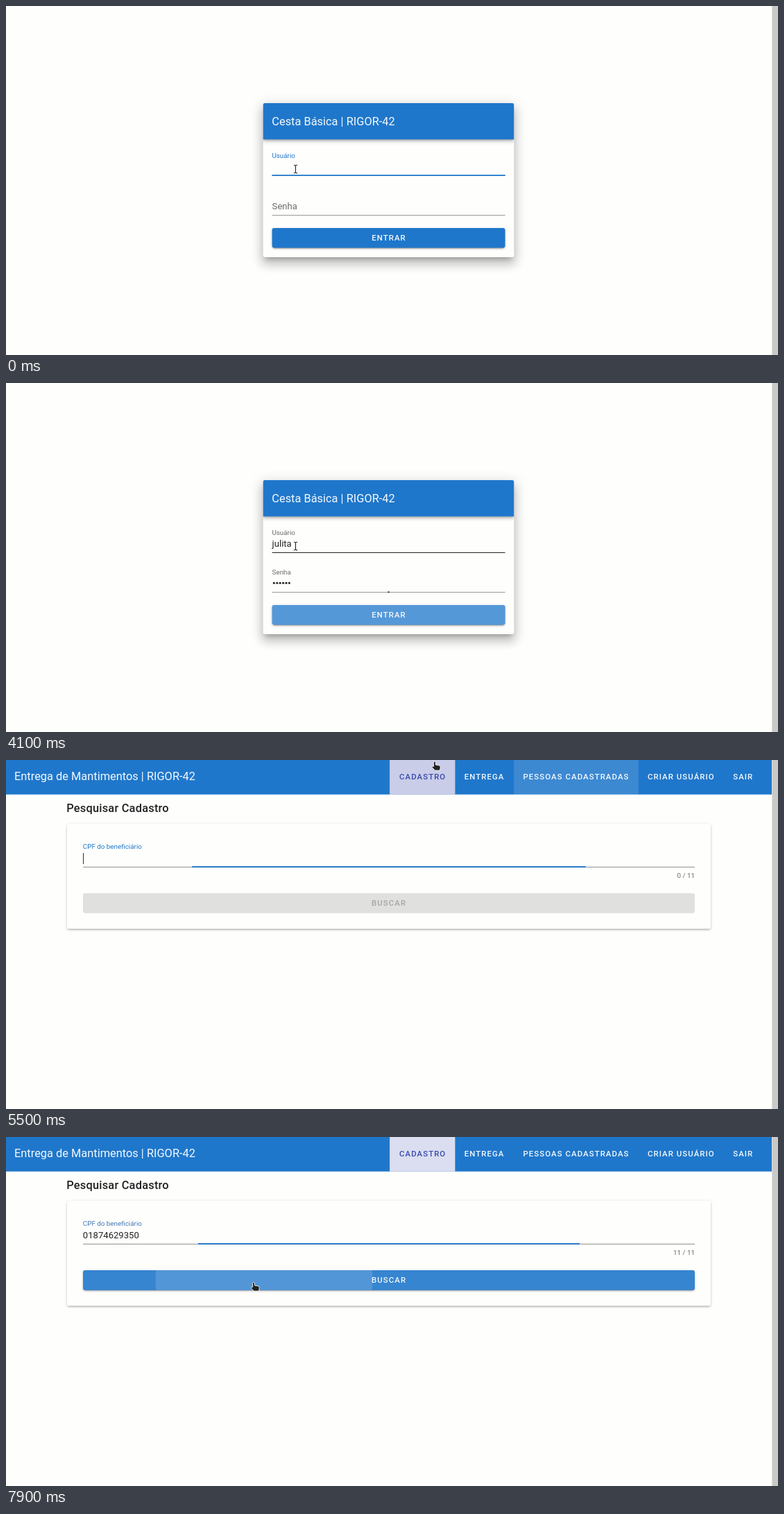
Recreate the animation shown at these times as an HTML page. Size 1113x503 px, loop 8 s.

```html
<!DOCTYPE html>
<html lang="pt-BR">
<head>
<meta charset="utf-8">
<title>Cesta Básica</title>
<style>
html, body { margin: 0; width: 100%; height: 100%; overflow: hidden; background: #fefefd; }
svg { display: block; width: 100vw; height: 100vh; }
text { font-family: Roboto, sans-serif; white-space: pre; }
.title { font-size: 16.4px; fill: #f4f8fc; }
.head { font-size: 16.4px; font-weight: 500; letter-spacing: .0125em; fill: #222; }
.btn { font-size: 11.48px; font-weight: 500; letter-spacing: .0893em; fill: #f4f8fc; }
.small { font-size: 9.84px; fill: #6b6b6b; }
.input { font-size: 13.12px; fill: #222; }
.row { font-size: 12.3px; fill: #222; }
.popup { font: 11.4px "Open Sans", sans-serif; fill: #e8e8e8; }
</style>
</head>
<body>
<svg id="stage" viewBox="0 0 1113 503" preserveAspectRatio="none"></svg>
<script>
const LOOP = 8000, STEP = 100;
const BLUE = '#1f77cb', PAPER = '#fefefd', GREY = '#6b6b6b';
const stage = document.getElementById('stage');

function set(node, attrs) {
  for (const k in attrs) node.setAttribute(k, attrs[k]);
  return node;
}
function add(parent, tag, attrs = {}) {
  const node = document.createElementNS('http://www.w3.org/2000/svg', tag);
  parent.appendChild(node);
  return set(node, attrs);
}
const group = (parent) => add(parent, 'g');
const rect = (parent, x, y, width, height, fill, rx = 0) =>
  add(parent, 'rect', { x, y, width, height, fill, rx });
function text(parent, cls, x, y, value, attrs = {}) {
  const node = add(parent, 'text', { class: cls, x, y, ...attrs });
  node.textContent = value;
  return node;
}
const show = (node, on) => set(node, { visibility: on ? 'visible' : 'hidden' });

// Each shadow layer: [offset y, blur, spread, alpha]
const LIFT = {
  low: [[3, 1, -2, .2], [2, 2, 0, .14], [1, 5, 0, .12]],
  mid: [[2, 4, -1, .2], [4, 5, 0, .14], [1, 10, 0, .12]],
  high: [[7, 8, -4, .2], [12, 17, 2, .14], [5, 22, 4, .12]],
  popup: [[2, 9, 0, .35]]
};
function raised(parent, x, y, w, h, fill, lift, rx = 3) {
  for (const [dy, blur, spread, alpha] of LIFT[lift]) {
    const s = spread * .82;
    rect(parent, x - s, y - s + dy * .82, w + 2 * s, h + 2 * s, '#000', rx)
      .style.cssText = `filter:blur(${blur * .41}px);opacity:${alpha}`;
  }
  return rect(parent, x, y, w, h, fill, rx);
}
function underline(parent, x, y, w, colour) {
  const base = rect(parent, x, y, w, 1, colour);
  const bar = rect(parent, x, y - .8, w, 1.8, BLUE);
  const fill = (part, least = 0) => {
    const width = Math.max(w * part, least);
    set(bar, { x: x + (w - width) / 2, width });
  };
  return { base, bar, fill };
}

// Progress of cubic-bezier(.25, .8, .25, 1) begun at a given time
function ease(t, start, length = 300) {
  const p = Math.min(1, Math.max(0, (t - start) / length));
  if (p === 0 || p === 1) return p;
  let lo = 0, hi = 1;
  for (let i = 0; i < 24; i++) {
    const s = (lo + hi) / 2, r = 1 - s;
    if (.75 * r * r * s + .75 * r * s * s + s * s * s < p) lo = s; else hi = s;
  }
  const s = lo, r = 1 - s;
  return 2.4 * r * r * s + 3 * r * s * s + s * s * s;
}
const lerp = (a, b, p) => a + (b - a) * p;
const within = (t, a, b) => t >= a && t < b;
const passed = (t, times) => times.filter(v => v <= t).length;

rect(stage, 0, 0, 1113, 503, PAPER);

// Login page
const login = group(stage);
raised(login, 370.5, 140, 362, 222, PAPER, 'high');
const headClip = add(add(login, 'clipPath', { id: 'card' }), 'rect',
  { x: 370.5, y: 140, width: 362, height: 222, rx: 3 });
const head = add(login, 'g', { 'clip-path': 'url(#card)' });
raised(head, 370.5, 140, 362, 52.3, BLUE, 'mid', 0);
text(login, 'title', 383.3, 172.3, 'Cesta Básica | RIGOR-42');

const userLabel = text(login, 'small', 383.4, 218.8, 'Usuário');
const userText = text(login, 'input', 383.6, 235.8, '');
const userLine = underline(login, 383.6, 244, 336, '#222');
const passLabel = text(login, 'input', 383.6, 293, 'Senha');
const passLine = underline(login, 383.6, 301.2, 336, '#929291');
const dots = Array.from({ length: 6 }, (_, i) =>
  add(login, 'circle', { cx: 386.4 + i * 4.4, cy: 288.3, r: 1.55, fill: '#222' }));

raised(login, 383.6, 320, 336, 28.6, BLUE, 'low');
const enterGlow = rect(login, 383.6, 320, 336, 28.6, '#fff', 3);
text(login, 'btn', 527.2, 337.5, 'ENTRAR');

const userPopup = group(login);
raised(userPopup, 383, 244.5, 337, 20.5, '#302e2d', 'popup', 0);
text(userPopup, 'popup', 389, 258.6, 'jsdasd');

// Pages behind the login
const app = group(stage);
rect(app, 0, 0, 1104, 49.7, BLUE);
text(app, 'title', 12, 29.3, 'Entrega de Mantimentos | RIGOR-42');
const TABS = [
  ['CADASTRO', 553.2, 94.2, 567], ['ENTREGA', 647.4, 84.8, 660.7],
  ['PESSOAS CADASTRADAS', 732.2, 179.6, 745.4],
  ['CRIAR USUÁRIO', 911.8, 123, 925], ['SAIR', 1034.8, 56, 1048.2]
];
const tabs = TABS.map(([name, x, w, tx]) => ({
  back: rect(app, x, 0, w, 49.7, '#fff'),
  tint: rect(app, x, 0, w, 49.7, '#3949ab'),
  label: text(app, 'btn', tx, 27.6, name)
}));
function paintTab(tab, back, tint, active) {
  set(tab.back, { opacity: back });
  set(tab.tint, { opacity: tint });
  tab.label.style.fill = active ? '#3949ab' : '#f4f8fc';
}

const list = group(app);
text(list, 'head', 87.2, 75, 'Pessoas cadastradas');
raised(list, 88, 92, 928, 39, PAPER, 'low');
text(list, 'row', 107.2, 116, 'Hugo de Nobres | 74915308261');
add(list, 'path', { d: 'M981.6 109.7l4.5 4.5 4.5-4.5', fill: 'none', stroke: '#707070', 'stroke-width': 1.6 });

const search = group(app);
text(search, 'head', 87.2, 75, 'Pesquisar Cadastro');
raised(search, 88, 92, 928, 151.5, PAPER, 'low');
const cpfLabel = text(search, 'small', 110.8, 128, 'CPF do beneficiário');
const cpfText = text(search, 'input', 110.8, 146, '');
const cpfLine = underline(search, 111, 153.8, 882, '#8c8c8b');
const counter = text(search, 'small', 993, 170, '', { 'text-anchor': 'end' });
const caret = rect(search, 111, 134, 1, 16, '#333');
rect(search, 111, 192, 882, 28.7, '#e0e0df', 3);
text(search, 'btn', 527, 210, 'BUSCAR').style.fill = '#a6a6a5';
const find = group(search);
raised(find, 111, 192, 882, 28.7, BLUE, 'low');
const findGlow = rect(find, 111, 192, 882, 28.7, '#fff', 3);
add(add(find, 'clipPath', { id: 'find' }), 'rect', { x: 111, y: 192, width: 882, height: 28.7, rx: 3 });
const ripple = add(find, 'circle',
  { cx: 372, cy: 206, r: 156.5, fill: '#fff', opacity: .14, 'clip-path': 'url(#find)' });
text(find, 'btn', 527, 210, 'BUSCAR');

const cpfPopup = group(search);
raised(cpfPopup, 110, 154, 882.5, 20, '#302e2d', 'popup', 0);
rect(cpfPopup, 110, 153.2, 882.5, .9, '#2a5f94');
text(cpfPopup, 'popup', 115.6, 168.3, 'sadasdas');

rect(stage, 1104.4, 0, 8.6, 503, '#c9c9c7');

// Pointer shapes, each with its hot spot at 0,0
const pointers = {
  beam: add(stage, 'path', { d: 'M-2.6-5.8Q0-5.8 0-4.6Q0-5.8 2.6-5.8M0-5V5M-2.6 5.8Q0 5.8 0 4.6Q0 5.8 2.6 5.8',
    fill: 'none', stroke: '#222', 'stroke-width': 1.1 }),
  arrow: add(stage, 'path', { d: 'M0 0V12.2L2.8 9.6 4.8 14 6.8 13.1 4.9 8.8H8.5Z',
    fill: '#1c1c1c', stroke: '#fff', 'stroke-width': .8 }),
  hand: add(stage, 'path', { d: 'M-1.4 1Q0-1 1.4 1V5L6.2 5.8Q8.6 6.3 8.3 8.8L7.4 13H.4L-4 8.3Q-3.8 6.3-1.4 7.4Z',
    fill: '#222', stroke: '#fff', 'stroke-width': .8 })
};

// [start, end, x, y]: the pointer travels to x,y in that span
const MOVES = [[4800, 5300, 618, 2], [5700, 6150, 334, 140], [7250, 7750, 357, 209]];
function pointerAt(t) {
  let x = 417, y = 234;
  for (const [a, b, tx, ty] of MOVES) {
    const p = Math.min(1, Math.max(0, (t - a) / (b - a)));
    const k = p * p * (3 - 2 * p);
    x = lerp(x, tx, k);
    y = lerp(y, ty, k);
  }
  return [x, y];
}
function pointerKind(t, x, y) {
  if (t < 4300) return 'beam';
  const overTab = y < 49 && x > 553;
  const overFind = t >= 7100 && y > 192 && y < 221;
  if (overTab || overFind) return 'hand';
  const overField = t >= 5400 && y > 128 && y < 155;
  return overField && !within(t, 6300, 7100) ? 'beam' : 'arrow';
}

function drawLogin(t) {
  userText.textContent = 'julita'.slice(0, passed(t, [200, 400, 600, 700, 800, 1100]));
  show(userPopup, within(t, 300, 400));
  userLabel.style.fill = t < 1300 ? BLUE : GREY;
  userLine.fill(1 - ease(t, 1200));

  const up = ease(t, 1900), typed = passed(t, [2200, 2500, 2600, 2800, 3100, 3200]);
  const focused = within(t, 2000, 3700);
  set(passLabel, { y: lerp(293, 275.8, up) });
  passLabel.style.fontSize = lerp(13.12, 9.84, up) + 'px';
  passLabel.style.fill = focused ? BLUE : GREY;
  passLine.fill(up - ease(t, 3650), t >= 3700 ? 2 : 0);
  set(passLine.bar, { fill: t >= 4000 ? '#222' : BLUE });
  dots.forEach((dot, i) => show(dot, i < typed));
  set(enterGlow, { opacity: .24 * (ease(t, 1250) - ease(t, 1900) + ease(t, 3650)) });
}

function drawApp(t, x, y) {
  const onSearch = t >= 5400;
  set(list, { display: onSearch ? 'none' : 'inline' });
  set(search, { display: onSearch ? 'inline' : 'none' });

  const hover = i => y < 49 && x > TABS[i][1] && x < TABS[i][1] + TABS[i][2];
  tabs.forEach((tab, i) => paintTab(tab, hover(i) ? .08 : 0, 0, false));
  if (!onSearch) {
    paintTab(tabs[2], 1, t < 4400 ? 0 : t < 4500 ? .06 : .18, true);
  } else {
    paintTab(tabs[0], 1, hover(0) ? .27 : .18, true);
    paintTab(tabs[2], t < 5500 ? .18 : t < 5600 ? .13 : 0, 0, false);
  }

  const filled = t >= 7100, blurred = t >= 7900;
  cpfText.textContent = filled ? '01874629350' : '';
  counter.textContent = filled ? '11 / 11' : '0 / 11';
  cpfLabel.style.fill = blurred ? '#4278b3' : BLUE;
  cpfLine.fill(ease(t, 5435) - ease(t, 7865));
  set(caret, { x: filled ? 192 : 111,
    opacity: within(t, 5500, 6000) || within(t, 6300, 6800) || within(t, 7100, 7600) ? 1 : 0 });
  set(cpfPopup, { display: within(t, 6300, 7100) ? 'inline' : 'none' });
  set(find, { opacity: ease(t, 7040) });
  set(findGlow, { opacity: filled && y > 192 ? .1 : 0 });
  set(ripple, { display: blurred ? 'inline' : 'none' });
}

function draw(t) {
  const inside = t >= 4300;
  set(login, { display: inside ? 'none' : 'inline' });
  set(app, { display: inside ? 'inline' : 'none' });
  const [x, y] = pointerAt(t);
  if (inside) drawApp(t, x, y); else drawLogin(t);
  const kind = pointerKind(t, x, y);
  for (const name in pointers) {
    const dx = name === 'beam' ? .5 : 0, dy = name === 'beam' ? 1 : 0;
    show(set(pointers[name], { transform: `translate(${x + dx} ${y + dy})` }), name === kind);
  }
}

const begin = performance.now();
function tick() {
  const t = (performance.now() - begin) % LOOP;
  draw(Math.floor(t / STEP) * STEP);
  requestAnimationFrame(tick);
}
tick();
</script>
</body>
</html>
```
